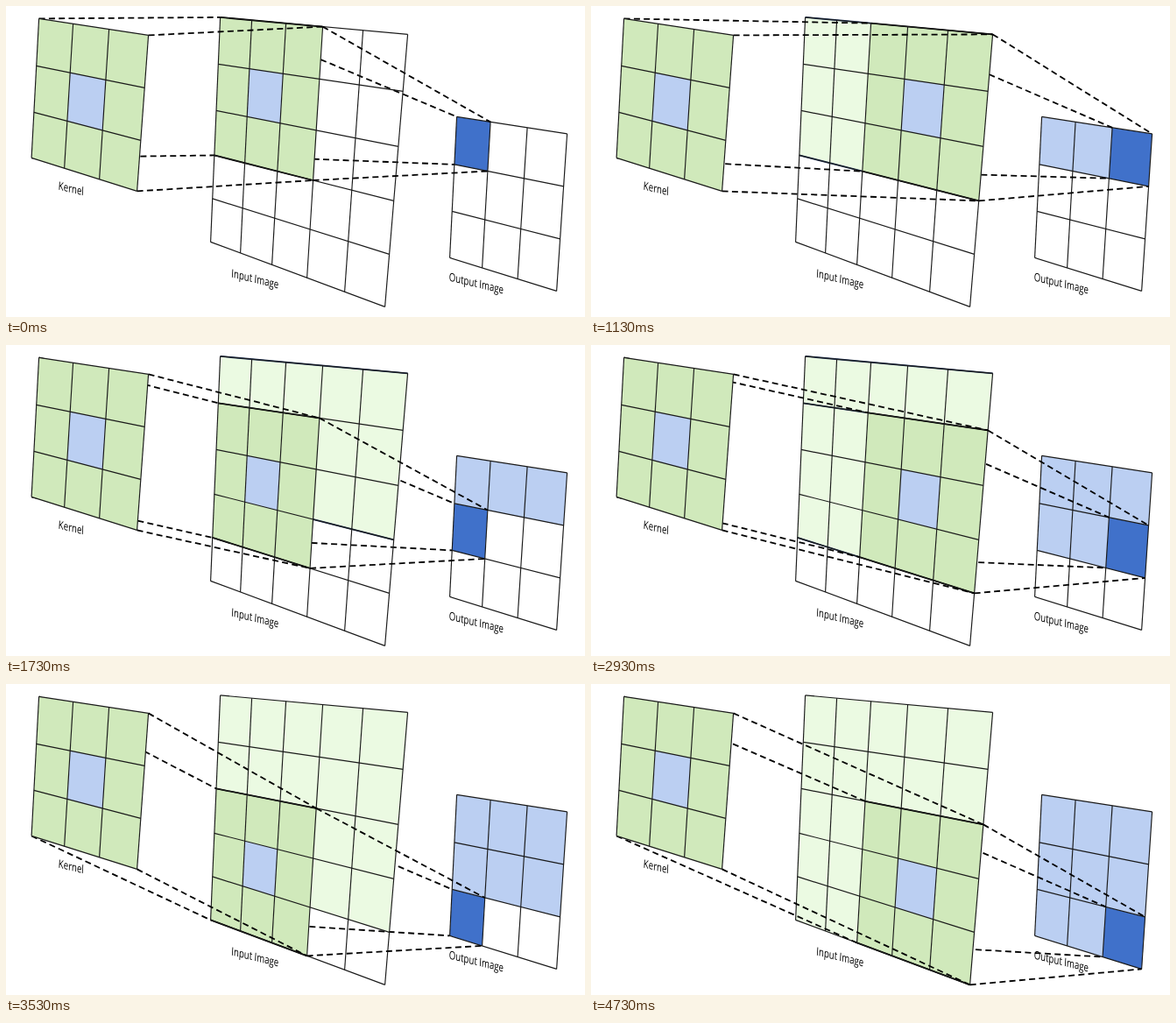
An HTML page for the animation above (5330 ms loop, 661 by 355 pixels).

```html
<!DOCTYPE html>
<html lang="en">
<head>
<meta charset="utf-8">
<title>Convolution</title>
<style>
  html, body { margin: 0; width: 100%; height: 100%; overflow: hidden; background: #fff; }
  svg { display: block; width: 661px; height: 355px; }
  text { font: 13px "Open Sans", "Noto Sans", sans-serif; fill: #000; }
  .grid { stroke: #1a1a1a; stroke-width: 1.15; fill: none; }
  .dash { stroke: #000; stroke-width: 1.8; stroke-dasharray: 7 4.3; fill: none; }
</style>
</head>
<body>
<svg viewBox="0 0 661 355"><g id="scene" transform="translate(-.4 .4)"></g></svg>
<script>
const GREEN = '#d0e9bb', PALE = '#ebfae2', BLUE = '#bbcff2', STRONG = '#4071ca', NAVY = '#1f3358';
const FIRST = 530, STEP = 600, COUNT = 9, LOOP = FIRST + STEP * (COUNT - 1);

// Grid lines run between matching points on opposite edges of a quad.
function makeGrid(topX, bottomX, leftY, rightY) {
  const n = topX.length - 1;
  const mix = (a, b, t) => a + (b - a) * t;
  const yOn = (xs, x, y0, y1) => mix(y0, y1, (x - xs[0]) / (xs[n] - xs[0]));
  const xOn = (ys, y, x0, x1) => mix(x0, x1, (y - ys[0]) / (ys[n] - ys[0]));
  function point(col, row) {
    const ax = topX[col], ay = yOn(topX, ax, leftY[0], rightY[0]);
    const bx = bottomX[col], by = yOn(bottomX, bx, leftY[n], rightY[n]);
    const cy = leftY[row], cx = xOn(leftY, cy, topX[0], bottomX[0]);
    const dy = rightY[row], dx = xOn(rightY, dy, topX[n], bottomX[n]);
    const ux = bx - ax, uy = by - ay, vx = dx - cx, vy = dy - cy;
    const t = ((cx - ax) * vy - (cy - ay) * vx) / (ux * vy - uy * vx);
    return [ax + ux * t, ay + uy * t];
  }
  return { n, point };
}

const kernel = makeGrid([38, 77, 118, 163], [29.5, 67, 107, 150], [14, 68, 121, 173], [33, 93, 153, 211]);
const input = makeGrid([245, 281, 320, 362, 408, 459], [234, 268, 304, 344, 387, 433],
  [12.5, 66, 119, 170, 219.5, 269], [32, 97, 160, 222, 283, 343]);
const output = makeGrid([515, 553.5, 595.5, 641], [507, 544, 584.5, 629],
  [126, 180.5, 234, 287], [145.5, 205.5, 265.5, 325]);

const path = (points, attrs) => `<path d="M${points.map(p => p.map(v => v.toFixed(1))).join('L')}" ${attrs}/>`;
const corners = (g, c, r, w, h) =>
  [g.point(c, r), g.point(c + w, r), g.point(c + w, r + h), g.point(c, r + h)];

// A filled block of cells, optionally with heavier top and bottom edges.
function area(g, c, r, w, h, fill, edge) {
  const q = corners(g, c, r, w, h);
  const heavy = `stroke="${edge}" stroke-width="1.8"`;
  return path(q, `fill="${fill}"`) +
    (edge ? path([q[0], q[1]], heavy) + path([q[3], q[2]], heavy) : '');
}

function lines(g) {
  let out = '';
  for (let i = 0; i <= g.n; i++) {
    out += path([g.point(i, 0), g.point(i, g.n)], 'class="grid"');
    out += path([g.point(0, i), g.point(g.n, i)], 'class="grid"');
  }
  return out;
}

const dash = (a, b) => path([a, b], 'class="dash"');
const label = (text, x, y) =>
  `<text transform="matrix(.74 .18 -.06 1 ${x} ${y})">${text}</text>`;

function drawStep(step) {
  const row = Math.floor(step / 3), col = step % 3;
  const from = corners(kernel, 0, 0, 3, 3);
  const via = corners(input, col, row, 3, 3);
  const to = corners(output, col, row, 1, 1);
  const edge = row < 2 ? NAVY : '';
  let out = '';
  if (row) out += area(output, 0, 0, 3, row, BLUE);
  if (col) out += area(output, 0, row, col, 1, BLUE);
  out += area(output, col, row, 1, 1, STRONG) + lines(output);

  // Far edges of the projection pass behind the visited cells.
  out += dash(via[0], to[0]) + dash(via[3], to[3]);
  if (row) out += area(input, 0, 0, 5, row + 2, PALE, edge);
  if (col) out += area(input, 0, row, col, 3, PALE, edge);
  out += area(input, col, row, 3, 3, GREEN, '#000');
  out += area(input, col + 1, row + 1, 1, 1, BLUE) + lines(input);

  out += dash(from[0], via[0]) + dash(from[3], via[3]);
  out += area(kernel, 0, 0, 3, 3, GREEN) + area(kernel, 1, 1, 1, 1, BLUE) + lines(kernel);
  for (const i of [1, 2]) out += dash(from[i], via[i]) + dash(via[i], to[i]);
  return `<g class="step" visibility="hidden">${out}</g>`;
}

const scene = document.getElementById('scene');
scene.innerHTML = Array.from({ length: COUNT }, (_, i) => drawStep(i)).join('') +
  label('Kernel', 60, 209) + label('Input Image', 257.5, 309) + label('Output Image', 506, 313);

const steps = scene.querySelectorAll('.step');
const start = performance.now();
let shown = -1;

function tick() {
  const t = (performance.now() - start) % LOOP;
  const current = t < FIRST ? 0 : 1 + Math.floor((t - FIRST) / STEP);
  if (current !== shown) {
    steps.forEach((g, i) => g.setAttribute('visibility', i === current ? 'visible' : 'hidden'));
    shown = current;
  }
  requestAnimationFrame(tick);
}
tick();
</script>
</body>
</html>
```
